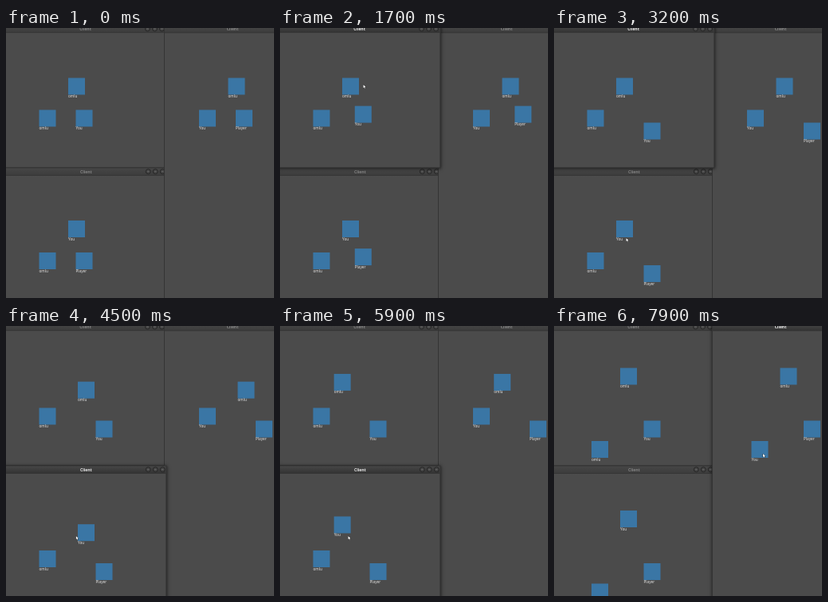
These frames come from a looping animation (336x338 px, 8 s). An HTML page with a canvas:

```html
<!DOCTYPE html>
<html lang="en">
<head>
<meta charset="utf-8">
<title>Three clients</title>
<style>
html, body { margin: 0; width: 100%; height: 100%; overflow: hidden; background: #4b4b4b; }
canvas { display: block; }
</style>
</head>
<body>
<canvas id="stage" width="336" height="338"></canvas>
<script>
const ctx = document.getElementById('stage').getContext('2d');
const LOOP = 8000, STEP = 100, SIZE = 21;

// Each player walks once from one spot to another, swaying on the way.
const players = [
  { name: 'omlu', from: [88.5, 73], to: [93.5, 63], start: 3600, end: 6500,
    sway: u => [24 * wave(7, u), 14.7 * wave(1, u)] },
  { name: 'omlu', from: [52, 113], to: [57.5, 154.5], start: 7200, end: 7900,
    sway: u => [10 * wave(1, u), 0] },
  { name: 'Player', from: [98, 113], to: [123, 129], start: 900, end: 2800,
    sway: u => [-5.4 * wave(6, u), 20 * wave(3, u)] }
];

// Pointer hops: start, end, and the spot reached
const hops = [
  [200, 500, 104.5, 71], [2500, 3200, 90.5, 263], [3700, 5200, 85.5, 263],
  [6300, 6700, 218.5, 187.5], [6700, 7000, 262, 160]
];

// dx, dy: offset of the shared scene; own: local player
const panes = [
  { x: 199, y: -3, w: 140, h: 345, title: [284, 1.5], dx: 200.5, dy: 0, own: 1 },
  { x: -3, y: -3, w: 201, h: 177.5, title: [99.5, 1.3], dx: 0, dy: 0, own: 2, buttons: 3 },
  { x: -3, y: 175.5, w: 201, h: 166, title: [100.3, 180], dx: 0, dy: 178.5, own: 0, buttons: 3 }
];

const clamp = u => Math.min(1, Math.max(0, u));
const mix = (a, b, u) => a + (b - a) * u;
const wave = (halfTurns, u) => Math.sin(halfTurns * Math.PI * u) * (1 - u / 2);

function place(p, t) {
  const u = clamp((t - p.start) / (p.end - p.start)), sway = p.sway(u);
  return p.from.map((a, i) => mix(a, p.to[i], u) + sway[i]);
}

function text(str, x, y, font, color, align) {
  ctx.font = font + ' "Noto Sans", sans-serif';
  ctx.fillStyle = color;
  ctx.textAlign = align;
  ctx.fillText(str, x, y);
}

function drawButton(x, y) {
  ctx.beginPath();
  ctx.arc(x, y, 3, 0, 7);
  ctx.fillStyle = '#444';
  ctx.fill();
  ctx.strokeStyle = '#262626';
  ctx.lineWidth = 1;
  ctx.stroke();
  ctx.fillStyle = '#737373';
  ctx.fillRect(x - 1, y - 0.4, 2, 0.8);
}

function drawPane(p, active, t) {
  const { x, y, h } = p, w = p.w + (active ? 2.5 : 0);
  const [titleX, titleY] = p.title, bar = titleY + 4.5;

  ctx.save();
  ctx.shadowColor = active ? 'rgba(0,0,0,.6)' : 'transparent';
  ctx.shadowBlur = 4;
  ctx.fillStyle = '#343434';
  ctx.fillRect(x - 1, y - 1, w + 2, h + 2);
  ctx.restore();

  ctx.save();
  ctx.beginPath();
  ctx.rect(x, y, w, h);
  ctx.clip();
  ctx.fillStyle = '#4b4b4b';
  ctx.fillRect(x, y, w, h);
  players.forEach((who, i) => {
    const [px, py] = place(who, t), left = px + p.dx - SIZE / 2, top = py + p.dy - SIZE / 2;
    ctx.fillStyle = '#3a76a5';
    ctx.fillRect(left, top, SIZE, SIZE);
    text(i === p.own ? 'You' : who.name, left, top + 24.5, '500 4.7px', '#e4e4e4', 'left');
  });

  const shade = ctx.createLinearGradient(0, bar - 9, 0, bar);
  shade.addColorStop(0, '#464646');
  shade.addColorStop(1, active ? '#333' : '#3c3c3c');
  ctx.fillStyle = shade;
  ctx.fillRect(x, y, w, bar - y);
  ctx.fillStyle = '#323232';
  ctx.fillRect(x, bar - 0.5, w, 0.8);
  text('Client', titleX, titleY + 1.8, 'bold 5px', active ? '#eee' : '#858585', 'center');
  for (let i = 0; i < p.buttons; i++) drawButton(titleX + 78 + 9 * i, titleY - 0.3);
  ctx.restore();
}

function drawPointer(t) {
  if (t <= hops[0][0]) return;
  let x = 250, y = 75;
  for (const [start, end, toX, toY] of hops) {
    const u = clamp((t - start) / (end - start));
    x = mix(x, toX, u);
    y = mix(y, toY, u);
  }
  ctx.save();
  ctx.translate(x, y);
  const arrow = new Path2D('M0 0V4L.9 3.2L1.6 4.7L2.3 4.3L1.7 2.9L2.9 2.8Z');
  ctx.strokeStyle = '#222';
  ctx.lineWidth = 0.8;
  ctx.stroke(arrow);
  ctx.fillStyle = '#fff';
  ctx.fill(arrow);
  ctx.restore();
}

function frame(now) {
  const t = Math.floor((now % LOOP) / STEP) * STEP;
  const focus = t < 700 ? -1 : t < 3400 ? 1 : t < 6900 ? 2 : 0;
  panes.forEach((p, i) => { if (i !== focus) drawPane(p, false, t); });
  if (focus >= 0) drawPane(panes[focus], true, t);
  drawPointer(t);
  requestAnimationFrame(frame);
}
requestAnimationFrame(frame);
</script>
</body>
</html>
```
